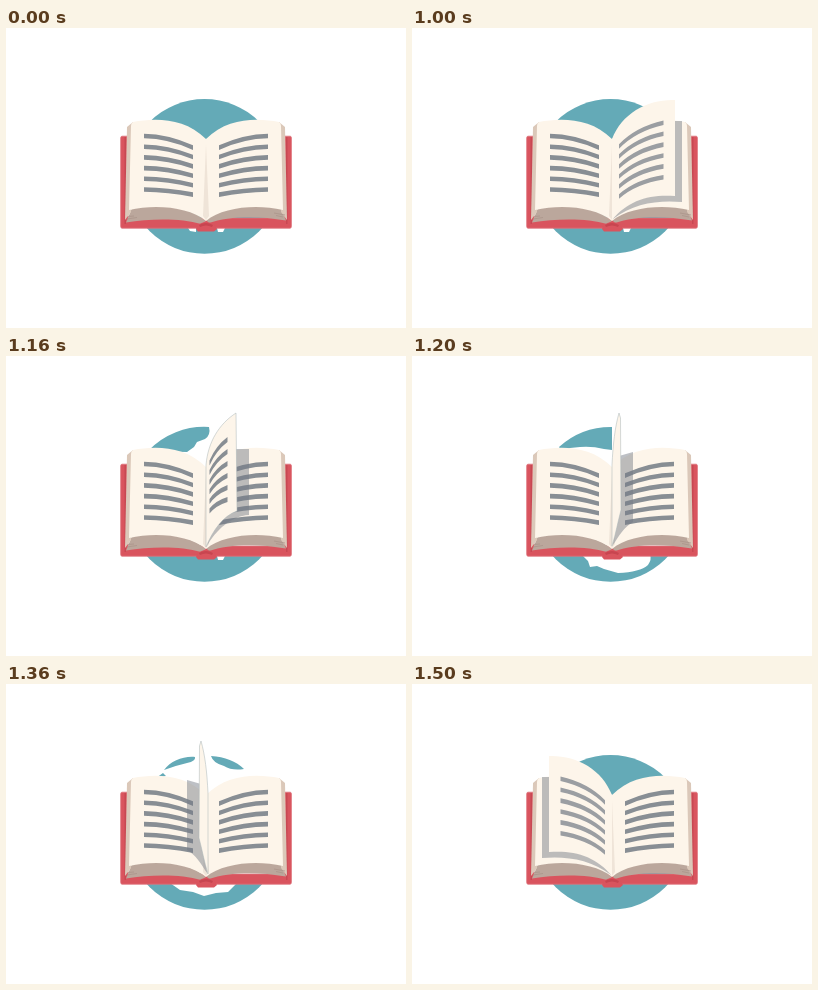
An HTML page that plays this animation: 400x300 px, repeating every 1.6 s.

```html
<!DOCTYPE html>
<html lang="en">
<head>
<meta charset="utf-8">
<title>Book with a turning page</title>
<style>
  html, body { margin: 0; width: 100%; height: 100%; overflow: hidden; background: #fff; }
  svg { display: block; width: 400px; height: 300px; }
  .teal { fill: #64aab7; }
  .page { fill: #fdf5ea; }
  .side { fill: #dbc8b9; }
  .under { fill: #bba79c; }
  .red { fill: #d9545e; }
  .cover { stroke: #dd727a; stroke-width: .8; }
  .text { fill: #888e94; }
  .pale { fill: #9b9ea2; }
  .shade { fill: #747985; fill-opacity: .47; }
  .edge { stroke: #a8b5b7; stroke-width: .5; }
</style>
</head>
<body>
<svg viewBox="0 0 400 300">
  <defs>
    <clipPath id="low"><rect x="100" y="190" width="200" height="40"/></clipPath>
    <g id="half">
      <path class="side" d="M273 94L279 99L281 192L275 184Z"/>
      <path class="page" d="M200 111C222 89 252 90 273 94Q275 95 275 98L277 182C250 176 217 179 200 193Z"/>
      <g id="lines" class="text"></g>
    </g>
  </defs>
  <g id="back"></g>
  <path class="red cover" d="M116 108.2H122V190H278V108.2H284.2Q285.4 108.2 285.4 110V198.5Q285.4 200.2 284 200.2H116Q114.7 200.2 114.7 198.5V110Q114.7 108.2 116 108.2Z"/>
  <path fill="#c84853" d="M118.5 109H120V196H118.5ZM280 109H281.5V196H280Z"/>
  <path class="under" d="M120 194.5L126 180C155 174 184 179 200 193L195 196C175 190 144 190.5 120 194.5Z"/>
  <path class="under" d="M203 195L200 192C217 177 250 175 275 180L280 192.5C252 187.5 222 188 203 195Z"/>
  <use href="#half"/>
  <use href="#half" transform="matrix(-1 0 0 1 400 0)"/>
  <path fill="none" stroke="#a99388" stroke-width=".7" d="M121 191L131 189.5M122 188.5L128 188M279 187L268 185M277 189L270 187.5"/>
  <path fill="#efe4d8" d="M200 116L203 188L200 192L197 188Z"/>
  <path class="red" d="M190 201Q191 195 200 194Q209 195 211 201L208 203.5H192Z"/>
  <path fill="#c84550" d="M193 197Q200 193 207 197L206 199Q200 196 194 199Z"/>
  <g id="leaf"></g>
</svg>
<script>
  const $ = id => document.getElementById(id);

  // A curved bar of constant height with upright ends.
  const bar = (x1, y1, cx, cy, x2, y2, h = 2.3) =>
    `<path d="M${x1} ${y1 - h}Q${cx} ${cy - h} ${x2} ${y2 - h}V${y2 + h}Q${cx} ${cy + h} ${x1} ${y1 + h}Z"/>`;
  const rows = draw => [0, 1, 2, 3, 4, 5].map(draw).join("");

  $("lines").innerHTML = rows(i => {
    const inner = 119.6 + i * 9.4, outer = 108 + i * 10.7;
    return bar(213, inner, 238, outer + .3, 262, outer);
  });

  // Right-hand poses of the leaf; the second half of the turn mirrors them.
  const wide = `
    <path class="shade" d="M255 93H270V174C246 172 222 175 201 191L212 160L255 150Z"/>
    <path class="page" d="M200 111C210 85 236 71 263 72V168C238 166 216 172 200 192Z"/>
    <g class="text pale">${rows(i => bar(207, 118.5 + i * 10, 224, 101 + i * 10.5, 251.5, 94.8 + i * 10.9))}</g>`;
  const half = `
    <path class="shade" d="M225 93H243V159C225 160 210 174 201 190L212 150H225Z"/>
    <path class="page edge" d="M200 109C202 86 213 68 230 57L231 155C217 160 207 174 200 191Z"/>
    <g class="text">${rows(i => bar(203.5, 107 + i * 9.6, 210, 92 + i * 11, 221.5, 83.5 + i * 12, 2.5))}</g>`;
  const thin = `
    <path class="shade" d="M207 100L221 96V166C212 171 207 180 201 189Z"/>
    <path class="page edge" d="M200 109C201 88 203 71 207 57L208.5 62L209 154C206 165 204 177 200 190Z"/>`;
  const flip = (leaf, dx = 0) => `<g transform="matrix(-1 0 0 1 ${400 + dx} 0)">${leaf}</g>`;

  const disc = '<circle class="teal" cx="198.5" cy="148.4" r="77.4"/>';
  const low = `<g clip-path="url(#low)">${disc}</g>`;
  const teal = d => `<path class="teal" d="${d}"/>`;
  const gap = d => `<path fill="#fff" d="${d}"/>`;
  const nick = gap("M211 200H219L217 204H212Z");

  const poses = [
    [1000, disc + nick + gap("M182 200H190V204L184 203Z"), ""],
    [100, disc + nick, wide],
    [100, teal("M142 95A77.4 77.4 0 0 1 203 71Q205 79 199 83L191 86L188 91L181 96Z") + low + nick, half],
    [100, teal("M147 91A77.4 77.4 0 0 1 200 71V94L192 93Q180 90 168 91L158 92L150 96Z")
        + low + gap("M170 199L176 205L178 211L185 210L192 213L206 217Q228 216 236 209Q240 203 238 199Z"), thin],
    [100, teal("M158 86C165 77 177 72 189 73Q190 77 181 79Q168 82 158 86ZM205 72C219 73 230 77 238 85Q226 87 218 82Q207 79 205 72ZM150 94L157 89L160 92Z")
        + low + gap("M164 199L174 206L187 208L198 212L210 209L222 208L231 199Z"), flip(thin, 2)],
    [100, teal("M190 73C213 67 235 76 248 93L232 97H219Q217 91 206 89Q196 88 191 82Z") + low, flip(half, -2)],
    [100, disc, flip(wide)]
  ];
  const loop = poses.reduce((sum, [span]) => sum + span, 0);

  let shown = -1;
  function show(t) {
    let i = 0;
    while (t >= poses[i][0]) t -= poses[i++][0];
    if (i === shown) return;
    shown = i;
    $("back").innerHTML = poses[i][1];
    $("leaf").innerHTML = poses[i][2];
  }

  const start = performance.now();
  function tick() {
    show((performance.now() - start) % loop);
    requestAnimationFrame(tick);
  }
  tick();
</script>
</body>
</html>
```
